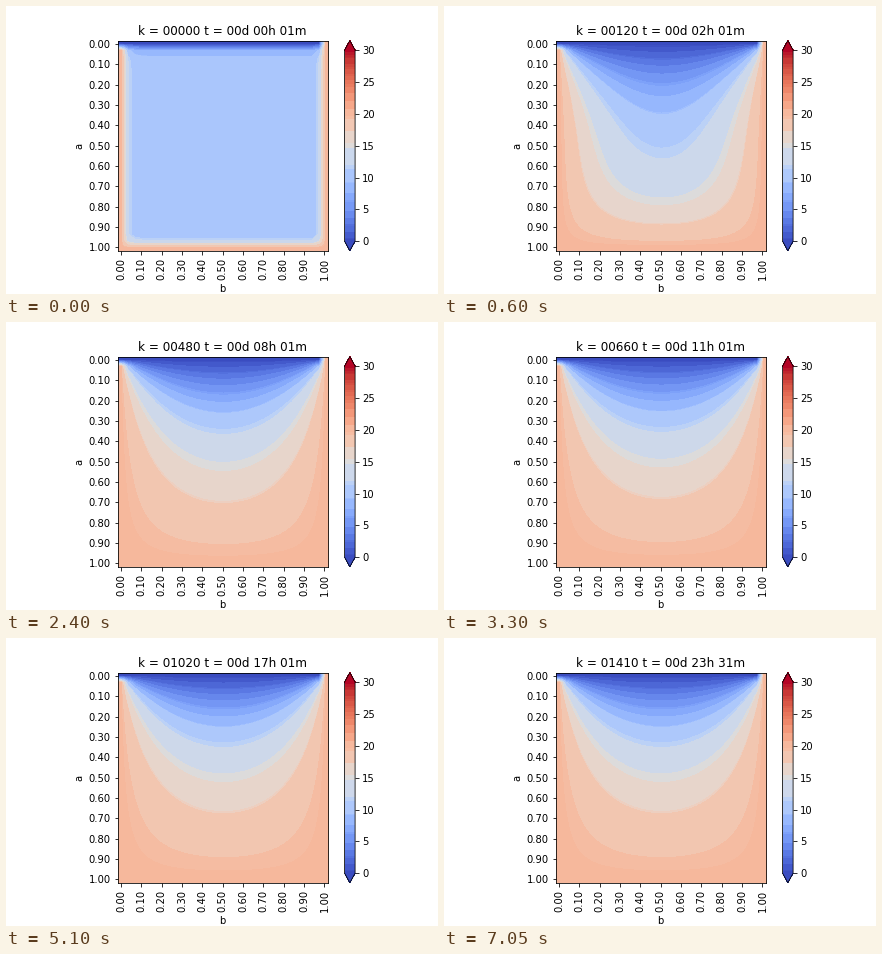
Animation, 432 px wide and 288 px high, one loop 7200 ms. Source, as a matplotlib script:

```python
import numpy as np
import matplotlib.pyplot as plt
from matplotlib.animation import FuncAnimation
from matplotlib.colors import ListedColormap

N = 30             # cells per side
RATE = 0.185       # diffusion number of one minute step
FRAMES, STEP, INTERVAL = 48, 30, 150
VMAX = 30

plt.rcParams.update({"font.family": "DejaVu Sans", "font.size": 10})


def start_field():
    u = np.full((N + 1, N + 1), 10.0)
    u[:, 0] = u[-1, :] = 20
    u[0, :] = 0
    u[:, -1] = 20
    return u.tolist()


def sweep(u):
    """One in-place heat step over the inner cells."""
    for i in range(1, N):
        up, row, down = u[i - 1], u[i], u[i + 1]
        for j in range(1, N):
            row[j] += RATE * (up[j] + down[j] + row[j - 1] + row[j + 1]
                              - 4 * row[j])


def solve():
    u, fields = start_field(), []
    for k in range((FRAMES - 1) * STEP + 1):
        sweep(u)
        if k % STEP == 0:
            fields.append(np.array(u))
    return fields


# Colours that share a coarse RGB bucket are merged into their mean.
RGB = plt.get_cmap("coolwarm")(np.arange(256), bytes=True)[:, :3].astype(int)
KEY = (RGB[:, 0] // 32) * 128 + (RGB[:, 1] // 16) * 8 + RGB[:, 2] // 32
BUCKET = np.unique(KEY, return_inverse=True)[1].ravel()

SIDE = 210
POS = np.clip((np.arange(SIDE) + 0.5) / SIDE * (N + 1) - 0.5, 0, N)
LOW = np.minimum(POS.astype(int), N - 1)
WEIGHT = np.eye(N + 1)[LOW] * (1 - POS + LOW)[:, None]
WEIGHT += np.eye(N + 1)[LOW + 1] * (POS - LOW)[:, None]


def banded_cmap(field):
    fine = WEIGHT @ field @ WEIGHT.T
    index = np.clip(fine / VMAX * 256, 0, 255).astype(int)
    count = np.bincount(index.ravel(), minlength=256) + 7.5   # plus colour bar
    count[[0, -1]] += 45
    total = np.bincount(BUCKET, count)
    mean = [np.bincount(BUCKET, count * RGB[:, c]) / total for c in range(3)]
    return ListedColormap(np.stack(mean, axis=1)[BUCKET] / 255)


fields = solve()
cmaps = [banded_cmap(f) for f in fields]

fig = plt.figure(figsize=(6, 4), dpi=72, facecolor="white")
fig.subplots_adjust(left=0.125, right=0.9, bottom=0.15, top=0.88)
ax = fig.add_subplot()
im = ax.imshow(fields[0], cmap=cmaps[0], vmin=0, vmax=VMAX,
               interpolation="bilinear")
fig.colorbar(im, ax=ax, extend="both", ticks=range(0, VMAX + 1, 5))

ticks = np.arange(0, N + 1, 3)
labels = [f"{t / N:.2f}" for t in ticks]
ax.set_xticks(ticks, labels, rotation=90)
ax.set_yticks(ticks, labels)
ax.set_xlabel("b")
ax.set_ylabel("a")
title = ax.set_title("", fontsize=12)


def draw(i):
    k = i * STEP
    hours, minutes = divmod(k + 1, 60)
    days, hours = divmod(hours, 24)
    im.set_data(fields[i])
    im.set_cmap(cmaps[i])
    title.set_text(f"k = {k:05d} t = {days:02d}d {hours:02d}h {minutes:02d}m")
    return im, title


anim = FuncAnimation(fig, draw, frames=FRAMES, interval=INTERVAL,
                     repeat=True, repeat_delay=0, blit=False)
plt.show()
```
